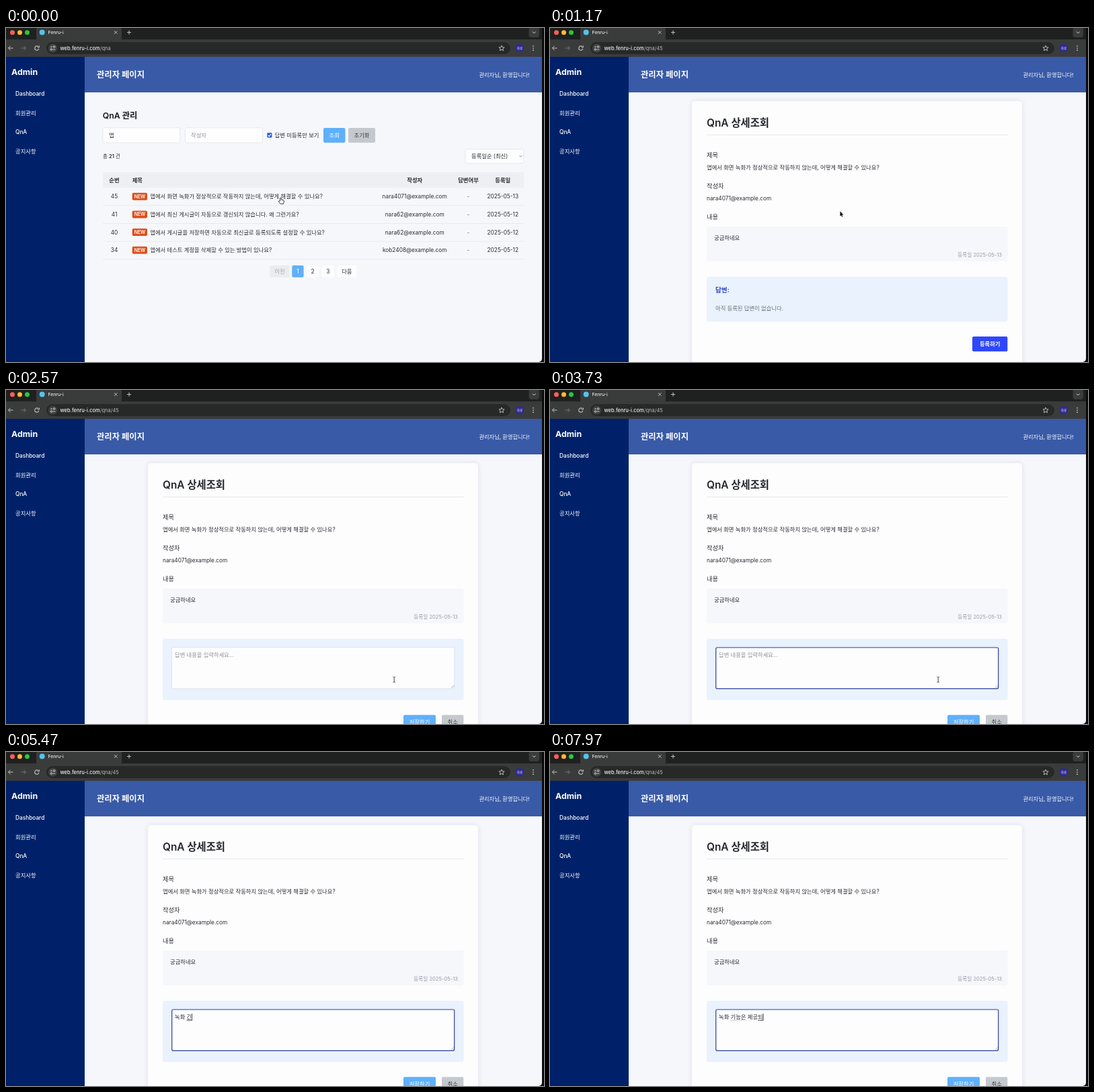
An HTML page with a canvas that plays this animation: 800 px wide and 498 px high, repeating every 8 s.

```html
<!DOCTYPE html>
<html lang="ko">
<head>
<meta charset="utf-8">
<title>관리자 페이지</title>
<style>
html, body { margin: 0; width: 100%; height: 100%; overflow: hidden; background: #0b0b0c; }
canvas { display: block; width: 100%; height: 100%; }
</style>
</head>
<body>
<canvas id="stage"></canvas>
<script>
const W = 800, H = 498, LOOP = 8000;
const FONT = "Inter, 'Noto Sans CJK KR', 'Noto Sans CJK', sans-serif";
const canvas = document.getElementById('stage');
const ctx = canvas.getContext('2d');

const SPIN_AT = 240, DETAIL_AT = 1000, EDIT_AT = 2050, FOCUS_AT = 3200, TYPE_AT = 4270;
const BLUE = '#5fb0fb', GRAY = '#c5c9ce', PAGE = '#f6f7fb', INK = '#2b2d33';
const QUESTION = '앱에서 화면 녹화가 정상적으로 작동하지 않는데, 어떻게 해결할 수 있나요?';
const WRITER = 'nara4071@example.com';
const ROWS = [
  ['45', QUESTION, WRITER, '2025-05-13'],
  ['41', '앱에서 최신 게시글이 자동으로 갱신되지 않습니다. 왜 그런가요?', 'nara62@example.com', '2025-05-12'],
  ['40', '앱에서 게시글을 저장하면 자동으로 최신글로 등록되도록 설정할 수 있나요?', 'nara62@example.com', '2025-05-12'],
  ['34', '앱에서 테스트 계정을 삭제할 수 있는 방법이 있나요?', 'kob2408@example.com', '2025-05-12']
];

// Each syllable block passes through its composing states.
const WORDS = [
  ['ㄴ', '노', '녹', '녹ㅎ', '녹호', '녹화', '녹화 '],
  ['ㄱ', '기', '긴', '기느', '기능', '기능ㅇ', '기능으', '기능은', '기능은 '],
  ['ㅈ', '제', '젝', '제고', '제공', '제공ㄷ', '제공도', '제공되']
];
const STATES = [];
WORDS.reduce((done, steps) => {
  steps.forEach(s => STATES.push(done + s));
  return done + steps[steps.length - 1];
}, '');

function typed(t) {
  if (t < TYPE_AT) return '';
  const slow = TYPE_AT + 9 * 130;
  const i = t < slow ? (t - TYPE_AT) / 130 : 9 + (t - slow) / 175;
  return STATES[Math.min(STATES.length - 1, Math.floor(i))];
}

function text(s, x, y, color = INK, size = 8.3, weight = 400, align = 'left') {
  ctx.font = `${weight} ${size}px ${FONT}`;
  ctx.textAlign = align;
  ctx.fillStyle = color;
  ctx.fillText(s, x, y + size * 0.36);
  return ctx.measureText(s).width;
}
const center = (s, x, y, color, size, weight) => text(s, x, y, color, size, weight, 'center');

function rect(x, y, w, h, color) {
  ctx.fillStyle = color;
  ctx.fillRect(x, y, w, h);
}

function box(x, y, w, h, r, fill, border, lw = 0.8) {
  ctx.beginPath();
  ctx.roundRect(x, y, w, h, r);
  if (fill) { ctx.fillStyle = fill; ctx.fill(); }
  if (border) { ctx.strokeStyle = border; ctx.lineWidth = lw; ctx.stroke(); }
}

function disc(x, y, r, color) {
  ctx.beginPath();
  ctx.arc(x, y, r, 0, 7);
  ctx.fillStyle = color;
  ctx.fill();
}

function line(points, color, lw = 1) {
  ctx.beginPath();
  for (let i = 0; i < points.length; i += 2) ctx.lineTo(points[i], points[i + 1]);
  ctx.strokeStyle = color;
  ctx.lineWidth = lw;
  ctx.stroke();
}

function button(s, x, y, w, h, fill, color, weight = 500) {
  box(x, y, w, h, 2, fill);
  center(s, x + w / 2, y + h / 2, color, 8.3, weight);
}

function star(x, y, r) {
  const p = [];
  for (let i = 0; i <= 10; i++) {
    const a = -Math.PI / 2 + i * Math.PI / 5, d = i % 2 ? r * 0.45 : r;
    p.push(x + d * Math.cos(a), y + d * Math.sin(a));
  }
  line(p, '#c9c9c9', 0.9);
}

function browser(path) {
  const icon = '#c4c4c4';
  rect(0, 0, 797, 18, '#1f2020');
  rect(0, 17, 797, 26, '#3a3b3b');
  box(45, -4, 127, 26, 6, '#3a3b3b');
  ['#fe5f57', '#febc2e', '#28c840'].forEach((c, i) => disc(9.5 + i * 11, 6.7, 3.5, c));
  disc(53.7, 6.6, 4, '#55c3ec');
  text('Fenru-i', 62.5, 6.6, '#e8e8e8', 6.8, 500);
  line([161, 4.3, 165.4, 8.7], icon);
  line([165.4, 4.3, 161, 8.7], icon);
  line([180, 6.6, 186, 6.6], icon);
  line([183, 3.6, 183, 9.6], icon);
  box(777.5, -1, 15.5, 15, 4, '#3a3b3b');
  line([783, 5.5, 785.3, 7.8, 787.6, 5.5], '#e0e0e0');

  line([10.5, 30, 3.5, 30], icon);
  line([6.6, 26.8, 3.4, 30, 6.6, 33.2], icon);
  line([22.5, 30, 29.5, 30], '#767777');
  line([26.4, 26.8, 29.6, 30, 26.4, 33.2], '#767777');
  ctx.beginPath();
  ctx.arc(46, 30, 3.1, 0.3, 5.5);
  ctx.strokeStyle = icon;
  ctx.lineWidth = 1.1;
  ctx.stroke();
  line([49.4, 26.4, 49.4, 29, 46.8, 29], icon);

  box(60, 21, 690, 18, 9, '#272828');
  disc(69.6, 30, 6.6, '#414242');
  line([66, 28, 69, 28], '#dedede', 0.9);
  line([70, 32, 73.3, 32], '#dedede', 0.9);
  [[71.7, 28], [67.5, 32]].forEach(([x, y]) => {
    ctx.beginPath();
    ctx.arc(x, y, 1.3, 0, 7);
    ctx.stroke();
  });
  const w = text('web.fenru-i.com', 80.5, 30, '#f0f0f0', 7.5, 500);
  text(path, 80.5 + w, 30, '#b9b9b9', 7.5);
  star(737, 30.3, 4.3);
  disc(764, 30, 6.3, '#302a91');
  center('하루', 764, 30, '#fff', 4.6, 500);
  [26.8, 30, 33.2].forEach(y => disc(784, y, 0.85, '#d0d0d0'));
}

function frame() {
  rect(0, 43, 797, 455, PAGE);
  rect(0, 43, 117, 455, '#002169');
  rect(117, 43, 680, 53, '#395aa7');
  text('Admin', 8, 65.5, '#fff', 12.4, 700);
  ['Dashboard', '회원관리', 'QnA', '공지사항'].forEach((s, i) =>
    text(s, 14, 98.5 + i * 28.4, '#fff', 8.3, 500));
  text('관리자 페이지', 135, 69.7, '#fff', 12.3, 600);
  text('관리자님, 환영합니다!', 778.5, 69.7, '#f5f7fc', 8.2, 500, 'right');
}

function list() {
  text('QnA 관리', 143.7, 131, '#17181b', 12.3, 600);
  box(144, 148.7, 115, 22.5, 2.5, '#fdfdfe', '#e2e4e9');
  text('앱', 153, 160);
  box(266.5, 148.7, 115, 22.5, 2.5, '#fdfdfe', '#e2e4e9');
  text('작성자', 275, 160, '#92959c');
  box(388.3, 156.3, 7.2, 7.2, 1.4, '#2563d9');
  line([389.9, 160, 391.4, 161.6, 394, 158.2], '#fff', 1.1);
  text('답변 미등록만 보기', 399.7, 160);
  button('조회', 472, 149, 32.5, 22, BLUE, '#fff');
  button('초기화', 509, 149, 40, 22, GRAY, '#3c4046');
  text('총', 144, 191, INK, 7.5);
  text('21', 153, 191, INK, 7.5, 600);
  text('건', 163, 191, INK, 7.5);
  box(683, 180.7, 86.7, 21, 2.5, '#fdfdfe', '#e2e4e9');
  text('등록일순 (최신)', 692, 191);
  line([763.4, 190, 765.4, 192, 767.4, 190], '#777b82', 0.9);

  rect(144, 215, 626, 23.3, '#eeeff2');
  text('제목', 187.7, 226.7, INK, 8.3, 600);
  [['순번', 161], ['작성자', 607.7], ['답변여부', 687.5], ['등록일', 738.8]].forEach(([s, x]) =>
    center(s, x, 226.7, INK, 8.3, 600));
  ROWS.forEach(([no, title, who, date], i) => {
    const y = 251.3 + i * 26.7;
    center(no, 161, y);
    box(187.7, y - 5.6, 22.3, 11, 2, '#de4f1a');
    center('NEW', 198.9, y, '#fff', 6.9, 600);
    text(title, 214.3, y);
    center(who, 607.7, y);
    center('-', 687.5, y, '#6d7077');
    center(date, 738.8, y);
    rect(144, y + 13, 626, 0.8, '#e5e7ec');
  });
  button('이전', 392.5, 354, 29, 17.7, '#ebecef', '#a2a5ab', 400);
  button('1', 425.3, 354, 17.3, 17.7, BLUE, '#fff', 500);
  button('2', 447, 354, 18, 17.7, '#fdfdfe', INK, 400);
  button('3', 469.8, 354, 18, 17.7, '#fdfdfe', INK, 400);
  button('다음', 492.3, 354, 29, 17.7, '#fdfdfe', INK, 400);
}

function spinner(t) {
  const a = -Math.PI / 4 + (t - SPIN_AT) / 1000 * Math.PI * 2;
  ctx.beginPath();
  ctx.arc(456.8, 140, 7.9, a, a + Math.PI * 1.5);
  ctx.strokeStyle = '#5ba9f9';
  ctx.lineWidth = 2.2;
  ctx.stroke();
}

function detail() {
  ctx.save();
  ctx.shadowColor = 'rgba(20,30,60,0.10)';
  ctx.shadowBlur = 9 * (canvas.width / W);
  box(211, 109, 491, 430, 5, '#fdfdfe');
  ctx.restore();
  text('QnA 상세조회', 233, 141, '#23262c', 15.4, 600);
  rect(233, 159, 447.5, 0.9, '#e4e6ea');
  text('제목', 233, 189.3, INK, 9.2, 500);
  text(QUESTION, 233, 208.5);
  text('작성자', 233, 235.3, INK, 9.2, 500);
  text(WRITER, 233, 254.5);
  text('내용', 233, 281.7, INK, 9.2, 500);
  box(233, 296, 447.5, 52, 3.5, PAGE);
  text('궁금하네요', 244, 313.5);
  text('등록일 2025-05-13', 672, 338.5, '#979ba3', 7.6, 400, 'right');
}

function answer() {
  box(233, 370.7, 447.5, 67.3, 3.5, '#e9f2fd');
  text('답변:', 246, 391, '#2c48c9', 9.6, 600);
  text('아직 등록된 답변이 없습니다.', 246, 418.5, '#6c7078');
  button('등록하기', 628, 460, 52.3, 22.2, '#2f47fb', '#fff', 600);
}

function editor(t) {
  const focus = t >= FOCUS_AT, s = typed(t), x = 251, y = 395.3;
  box(233, 370.7, 447.5, 91.5, 3.5, '#e9f2fd');
  if (focus) box(246.7, 384, 420, 61.3, 2, '#fdfdfe', '#2b3f9c', 1.2);
  else box(246.5, 383.6, 420.3, 61.8, 1, '#fdfdfe', '#d9dde4');
  line([662, 444, 666, 440], '#9a9da3', 0.7);
  line([664.2, 444, 666, 442.2], '#9a9da3', 0.7);

  let end = x;
  if (s) {
    const width = part => ctx.measureText(part).width;
    end += text(s, x, y);
    if (!s.endsWith(' ')) {
      const from = x + width(s.slice(0, -1));
      rect(from, 399.6, end - from, 0.9, '#33363c');
    }
    if (s.includes('기능은 ')) {
      const from = x + width('녹화 ');
      ctx.setLineDash([1.2, 1]);
      line([from, 400, from + width('기능은'), 400], '#8d9198', 0.8);
      ctx.setLineDash([]);
    }
  } else {
    text('답변 내용을 입력하세요...', x, y, '#8e929a');
  }
  if (focus && (s || (t - FOCUS_AT) % 1000 < 500)) rect(end, 390, 0.8, 10.5, '#222');

  button('저장하기', 591, 484.5, 48, 22, BLUE, '#fff');
  button('취소', 648, 484.5, 32.3, 22, GRAY, '#3c4046');
}

function ease(t, from, to) {
  const p = Math.max(0, Math.min(1, (t - from) / (to - from)));
  return p * p * (3 - 2 * p);
}

function arrow(x, y) {
  ctx.beginPath();
  [0, 0, 0, 7.4, 1.7, 5.9, 2.8, 8.4, 3.9, 7.9, 2.8, 5.4, 5, 5.2]
    .forEach((v, i, p) => { if (i % 2 === 0) ctx.lineTo(x + v, y + p[i + 1]); });
  ctx.closePath();
  ctx.lineJoin = 'round';
  ctx.strokeStyle = '#fff';
  ctx.lineWidth = 1.3;
  ctx.stroke();
  ctx.fillStyle = '#111';
  ctx.fill();
}

function hand(x, y) {
  ctx.save();
  ctx.translate(x, y);
  ctx.beginPath();
  ctx.moveTo(-0.9, 5);
  ctx.lineTo(-0.9, 0.6);
  ctx.quadraticCurveTo(0, -0.6, 0.8, 0.6);
  ctx.lineTo(0.9, 3);
  ctx.lineTo(4.2, 3.8);
  ctx.quadraticCurveTo(5.2, 4.2, 4.8, 6);
  ctx.lineTo(3.9, 9.2);
  ctx.lineTo(-0.3, 9.2);
  ctx.lineTo(-3.2, 5.7);
  ctx.quadraticCurveTo(-3, 4.4, -1.9, 4.9);
  ctx.closePath();
  ctx.fillStyle = '#fff';
  ctx.fill();
  ctx.strokeStyle = '#222';
  ctx.lineWidth = 0.9;
  ctx.stroke();
  ctx.restore();
}

function beam(x, y) {
  line([x, y - 3.5, x, y + 3.5], '#333', 0.9);
  line([x - 1.8, y - 4.2, x, y - 3.5, x + 1.8, y - 4.2], '#333', 0.8);
  line([x - 1.8, y + 4.2, x, y + 3.5, x + 1.8, y + 4.2], '#333', 0.8);
}

function pointer(t) {
  if (t >= TYPE_AT) return;
  const a = ease(t, 1050, 1700), b = ease(t, 2150, 2500);
  const x = 408.5 + 251 * a - 82.3 * b, y = 253 + 223 * a - 44.2 * b;
  const inside = (l, top, r, bottom) => x > l && x < r && y > top && y < bottom;
  if (t < SPIN_AT) hand(x, y);
  else if (t >= DETAIL_AT && t < EDIT_AT && inside(628, 460, 680, 482)) hand(x, y);
  else if (t >= EDIT_AT && inside(246, 383, 667, 445)) beam(x, y);
  else arrow(x, y);
}

function draw(t) {
  const w = Math.round(innerWidth * devicePixelRatio), h = Math.round(innerHeight * devicePixelRatio);
  if (canvas.width !== w || canvas.height !== h) { canvas.width = w; canvas.height = h; }
  ctx.setTransform(w / W, 0, 0, h / H, 0, 0);
  rect(0, 0, W, H, '#0b0b0c');
  ctx.save();
  ctx.beginPath();
  ctx.roundRect(0, 0, 797, H, [0, 0, 5, 0]);
  ctx.clip();
  browser(t < SPIN_AT ? '/qna' : '/qna/45');
  frame();
  if (t < SPIN_AT) list();
  else if (t < DETAIL_AT) spinner(t);
  else {
    detail();
    if (t < EDIT_AT) answer();
    else editor(t);
  }
  pointer(t);
  ctx.restore();
}

const start = performance.now();
function tick() {
  draw((performance.now() - start) % LOOP);
  requestAnimationFrame(tick);
}
tick();
</script>
</body>
</html>
```
